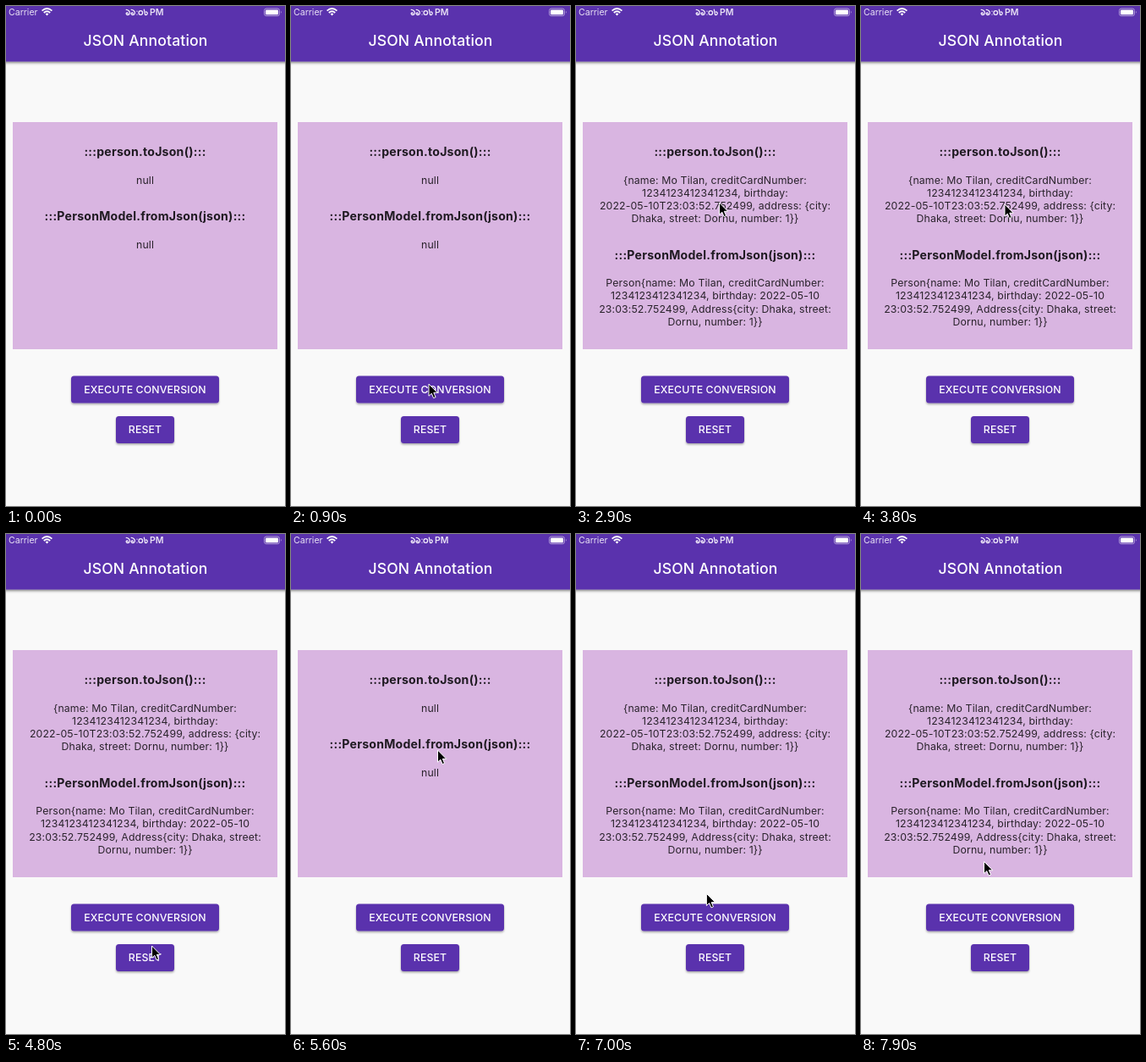
Recreate the animation shown at these times as an HTML page. Size 330 by 590 pixels, loop 8 s.

```html
<!DOCTYPE html>
<html lang="en">
<head>
<meta charset="utf-8">
<title>JSON Annotation</title>
<style>
html, body { margin: 0; width: 100%; height: 100%; overflow: hidden; background: #f9f9f9; }
svg { display: block; }
text { font: 12.32px Inter, Roboto, sans-serif; letter-spacing: .12px; text-anchor: middle; fill: #2a232c; }
.head { font-size: 14.08px; font-weight: 700; letter-spacing: .25px; fill: #1f1a21; }
.title { font-size: 17.6px; font-weight: 500; letter-spacing: .15px; fill: #fff; }
.label { font-weight: 500; fill: #fff; }
.status { font-size: 10.56px; letter-spacing: 0; text-anchor: start; fill: #e9e2f5; }
</style>
</head>
<body>
<svg width="330" height="590" viewBox="0 0 330 590">
  <defs>
    <filter id="barShadow" x="-10%" y="-20%" width="120%" height="150%">
      <feDropShadow dx="0" dy="1.5" stdDeviation="1.7" flood-opacity=".5"/>
    </filter>
    <filter id="buttonShadow" x="-10%" y="-20%" width="120%" height="160%">
      <feDropShadow dx="0" dy="1.5" stdDeviation="1" flood-opacity=".35"/>
    </filter>
    <clipPath id="executeClip"><rect x="77" y="436.5" width="175" height="32" rx="3.5"/></clipPath>
    <clipPath id="resetClip"><rect x="130" y="484" width="69" height="32" rx="3.5"/></clipPath>
  </defs>
  <rect width="330" height="590" fill="#f9f9f9"/>
  <rect x="-8" y="-8" width="346" height="73.5" fill="#5a30ad" filter="url(#barShadow)"/>

  <text class="status" x="3" y="11">Carrier</text>
  <g fill="none" stroke="#fff" stroke-width="1.8">
    <path d="M42.6 5.6Q48.5 .3 54.4 5.6M44.8 8Q48.5 4.6 52.2 8"/>
    <path d="M46.6 9.3Q48.5 7.6 50.4 9.3L48.5 11.4Z" fill="#fff" stroke="none"/>
  </g>
  <!-- Bengali clock digits -->
  <g fill="none" stroke="#f4effb" stroke-width="1.25" stroke-linecap="round">
    <path id="one" d="M142.2 4.4C144.5 4.6 146.8 6.2 146.4 8.6C145.8 11.3 142 10.9 142.2 8.9C142.4 7.4 144.6 7.8 144.2 9.2"/>
    <use href="#one" x="6"/>
    <path d="M155 6.1v.1M155 10v.1"/>
    <circle cx="159.3" cy="8" r="2.3"/>
    <path d="M163.3 4.2L164.6 10.5C167.6 10.8 168.3 7 165.4 6.9"/>
  </g>
  <text class="status" x="170" y="11" font-weight="600" style="font-weight:600">PM</text>
  <rect x="305.5" y="3" width="18" height="8.6" rx="2.4" fill="none" stroke="#b9a6dd" stroke-width=".9"/>
  <rect x="306.9" y="4.4" width="15.2" height="5.8" rx="1.3" fill="#fff"/>
  <path d="M325 5.8q1.6 1.5 0 3z" fill="#b9a6dd"/>
  <text class="title" x="165" y="47.2">JSON Annotation</text>

  <rect x="8" y="137" width="313" height="268" fill="#d9b5e1"/>
  <g id="empty"></g>
  <g id="filled"></g>

  <g fill="#5a30ad">
    <rect x="77" y="436.5" width="175" height="32" rx="3.5" filter="url(#buttonShadow)"/>
    <rect x="130" y="484" width="69" height="32" rx="3.5" filter="url(#buttonShadow)"/>
  </g>
  <g clip-path="url(#executeClip)"><circle id="executeRipple" fill="#fff"/></g>
  <g clip-path="url(#resetClip)"><circle id="resetRipple" fill="#fff"/></g>
  <text class="label" x="164.5" y="457">EXECUTE CONVERSION</text>
  <text class="label" x="164.5" y="504.4">RESET</text>

  <path id="cursor" d="M0 0V14.2L3.3 11.2L5.6 16.6L8.1 15.5L5.8 10.3H10.2Z"
        fill="#000" stroke="#fff" stroke-width="1" stroke-linejoin="round"/>
</svg>
<script>
const LOOP = 8000, LINE = 15.2;
const $ = id => document.getElementById(id);
const heads = [':::person.toJson():::', ':::PersonModel.fromJson(json):::'];
const json = [
  '{name: Mo Tilan, creditCardNumber:',
  '1234123412341234, birthday:',
  '2022-05-10T23:03:52.752499, address: {city:',
  'Dhaka, street: Dornu, number: 1}}'
];
const model = [
  'Person{name: Mo Tilan, creditCardNumber:',
  '1234123412341234, birthday: 2022-05-10',
  '23:03:52.752499, Address{city: Dhaka, street:',
  'Dhaka, number: 1}}'.replace('Dhaka', 'Dornu')
];

function addText(group, text, y, cls = '') {
  const el = document.createElementNS('http://www.w3.org/2000/svg', 'text');
  el.setAttribute('x', 164.5);
  el.setAttribute('y', y);
  el.setAttribute('class', cls);
  el.textContent = text;
  group.append(el);
}

function addResults(group, blocks) {
  let y = 177.3;
  blocks.forEach((lines, i) => {
    addText(group, heads[i], y, 'head');
    lines.forEach((line, n) => addText(group, line, y + 32.5 + n * LINE, ''));
    y += 60.5 + lines.length * LINE;
  });
}
addResults($('empty'), [['null'], ['null']]);
addResults($('filled'), [json, model]);

// Cursor stops: time, x, y
const path = [
  [200, 330, 575], [800, 163, 446], [1050, 163, 446], [1600, 109.5, 246.5],
  [2100, 112, 246], [2900, 169.5, 232], [3900, 170, 234], [4600, 172.5, 486],
  [5050, 172.5, 486], [5600, 173.5, 255], [5700, 173.5, 256], [6150, 158.5, 442],
  [6700, 158.5, 442], [7500, 145.5, 386.5], [8000, 145.5, 386.5]
];
const taps = [
  { at: 950, ripple: 'executeRipple', filled: true },
  { at: 4950, ripple: 'resetRipple', filled: false },
  { at: 6280, ripple: 'executeRipple', filled: true }
];

function cursorAt(t) {
  const i = path.findIndex(p => p[0] > t);
  if (i < 1) return null;
  const [t0, x0, y0] = path[i - 1], [t1, x1, y1] = path[i];
  const u = (t - t0) / (t1 - t0), e = u * u * (3 - 2 * u);
  return [x0 + (x1 - x0) * e, y0 + (y1 - y0) * e];
}

function draw(t) {
  const pos = cursorAt(t);
  $('cursor').style.display = pos ? '' : 'none';
  if (pos) $('cursor').setAttribute('transform', `translate(${pos})`);

  let filled = false;
  $('executeRipple').setAttribute('opacity', 0);
  $('resetRipple').setAttribute('opacity', 0);
  for (const tap of taps) {
    if (t < tap.at) continue;
    filled = tap.filled;
    const u = (t - tap.at) / 400;
    if (u > 1) continue;
    const [cx, cy] = cursorAt(tap.at);
    const ripple = { cx, cy: cy + 2, r: 12 + 75 * u * u * (3 - 2 * u), opacity: .16 * (1 - u) };
    for (const key in ripple) $(tap.ripple).setAttribute(key, ripple[key]);
  }
  $('filled').style.display = filled ? '' : 'none';
  $('empty').style.display = filled ? 'none' : '';
}

const start = performance.now();
function frame() {
  draw((performance.now() - start) % LOOP);
  requestAnimationFrame(frame);
}
frame();
</script>
</body>
</html>
```
